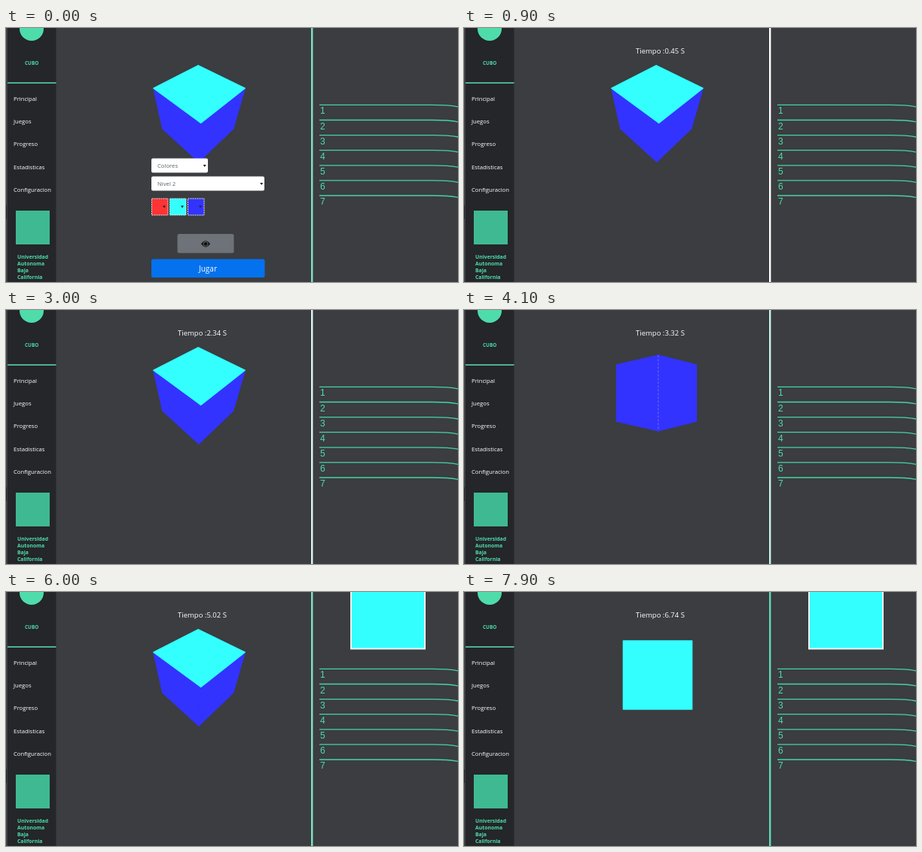
These frames come from a looping animation (600 by 338 pixels, 8 s). An HTML page:

```html
<!DOCTYPE html>
<html lang="es">
<head>
<meta charset="utf-8">
<title>Cubo</title>
<style>
  html, body { margin: 0; width: 100%; height: 100%; overflow: hidden; background: #3b3d40; }
  svg { display: block; width: 600px; height: 338px; font-family: "Open Sans", "Noto Sans", sans-serif; }
  .menu { fill: #fff; font-size: 7.7px; }
  .brand { fill: #4edcaa; font-weight: bold; font-size: 6.85px; }
  .rank { fill: #4edcaa; font: 12px "Liberation Sans", Arial, sans-serif; }
  .rule { fill: none; stroke: #46d3a3; stroke-width: 1.3; }
  .field { fill: #fff; }
  .choice { fill: #5a6068; font-size: 7.7px; }
  .swatch { stroke: #e4e4e4; stroke-width: 1; stroke-dasharray: 2 1; }
</style>
</head>
<body>
<svg viewBox="0 0 600 338">
  <rect width="600" height="338" fill="#3b3d40"/>
  <rect width="2" height="338" fill="#404245"/>
  <rect y="236" width="1" height="18" fill="#222427"/>
  <rect x="2" width="64.5" height="338" fill="#242629"/>
  <circle cx="34" cy="1" r="16" fill="#4edcaa"/>
  <text class="brand" x="25" y="48.5" style="font-size:6.4px">CUBO</text>
  <rect x="2" y="72.3" width="64.5" height="1.5" fill="#5fdcb9"/>
  <g id="menu"></g>
  <rect x="13" y="243" width="45" height="45" fill="#3fb991"/>
  <g id="school"></g>
  <rect id="bar" x="405" width="2.4" height="338"/>
  <g id="ranks"></g>
  <path id="answer" d="M458 -2V75.5H556V-2" fill="#33ffff" stroke="#f2f5f5" stroke-width="2"/>
  <g id="cube" stroke-width="1.5" stroke-linejoin="round"></g>
  <line id="edge" stroke="#c4c8e8" stroke-width=".8" stroke-dasharray="3 2"/>
  <text id="timer" x="228" y="33.6" fill="#fff" font-size="9.5"></text>
  <g id="setup">
    <rect class="field" x="193" y="173.5" width="75" height="19" rx="2"/>
    <text class="choice" x="201" y="186">Colores</text>
    <rect class="field" x="193" y="197.5" width="150" height="19" rx="2"/>
    <text class="choice" x="201" y="210">Nivel 2</text>
    <rect class="swatch" x="193.5" y="227" width="21.5" height="22" fill="#ff3333"/>
    <rect class="swatch" x="217.5" y="227" width="21.5" height="22" fill="#33ffff"/>
    <rect class="swatch" x="241.5" y="227" width="21.5" height="22" fill="#3333ff"/>
    <path fill="#222" d="M261.7 182h4l-2 3zM337.2 206h4l-2 3zM208 236.5h4l-2 3zM232 236.5h4l-2 3zM256 236.5h4l-2 3z"/>
    <rect x="227.5" y="274" width="75" height="25.5" rx="2.5" fill="#6d7378"/>
    <path d="M259 287.3Q265 279 271 287.3Q265 295.600 259 287.3Z" fill="#111"/>
    <circle cx="265" cy="287.3" r="3" fill="none" stroke="#6d7378" stroke-width=".9"/>
    <rect x="193" y="307.500" width="150.500" height="24.500" rx="2.5" fill="#0472ef"/>
    <text x="268" y="323.500" fill="#fff" font-size="10" text-anchor="middle">Jugar</text>
  </g>
</svg>
<script>
const LOOP = 8000, START = 400, ANSWERED = 5900;
const $ = id => document.getElementById(id);
const label = (cls, x, y, s) => `<text class="${cls}" x="${x}" y="${y}">${s}</text>`;

$('menu').innerHTML = ['Principal', 'Juegos', 'Progreso', 'Estadisticas', 'Configuracion']
  .map((s, i) => label('menu', 10, 97 + i * 30.2, s)).join('');
$('school').innerHTML = ['Universidad', 'Autonoma', 'Baja', 'California']
  .map((s, i) => label('brand', 15, 307.3 + i * 9, s)).join('');
$('ranks').innerHTML = Array.from({ length: 7 }, (_, i) => {
  const y = 102.4 + i * 20.1;
  return `<path class="rule" d="M416 ${y}H566Q588 ${y} 601 ${y + 2.6}"/>` + label('rank', 417, y + 12, i + 1);
}).join('');

// Linear interpolation through [time, value] pairs.
function track(keys, t) {
  const i = keys.findIndex(k => k[0] > t);
  if (i < 0) return keys.at(-1)[1];
  if (i === 0) return keys[0][1];
  const [t0, v0] = keys[i - 1], [t1, v1] = keys[i];
  return v0 + (v1 - v0) * (t - t0) / (t1 - t0);
}
const CLOCK = [[400, 0], [900, .45], [2000, 1.44], [4100, 3.32], [5200, 4.3], [6900, 5.84], [7900, 6.74]];
const PITCH = [[3100, 45], [3500, 0], [4150, 0], [4500, 45], [7350, 45], [7750, 90]];
const YAW = [[7350, 45], [7750, 0]];

const HALF = 37.4, DEPTH = 208;
const RING = [[-1, 1], [1, 1], [1, -1], [-1, -1]];

function project(x, y, z, pitch, yaw) {
  const cp = Math.cos(pitch), sp = Math.sin(pitch), cy = Math.cos(yaw), sy = Math.sin(yaw);
  const depth = z * cy - x * sy;
  const scale = DEPTH / (DEPTH - HALF * (depth * cp - y * sp));
  return [248.5 + (7 + HALF * (x * cy + z * sy)) * scale, 110.5 + HALF * (y * cp + depth * sp) * scale];
}

function drawCube(pitchDeg, yawDeg) {
  const rad = Math.PI / 180;
  const ring = y => RING.map(([x, z]) => project(x, y, z, pitchDeg * rad, yawDeg * rad));
  const top = ring(-1), base = ring(1);
  const faces = top.map((p, i) => {
    const j = (i + 1) % 4;
    return ['#3333ff', [p, top[j], base[j], base[i]]];
  });
  faces.push(['#33ffff', [...top].reverse()]);
  const area = q => q.reduce((sum, [x, y], i) => {
    const [u, v] = q[(i + 1) % 4];
    return sum + x * v - u * y;
  }, 0);
  $('cube').innerHTML = faces.filter(f => area(f[1]) > 1)
    .map(([c, q]) => `<polygon points="${q.join(' ')}" fill="${c}" stroke="${c}"/>`).join('');
  const [x1, y1] = top[0], [x2, y2] = base[0];
  Object.entries({ x1, y1, x2, y2, opacity: Math.max(0, .5 - pitchDeg / 90) })
    .forEach(([k, v]) => $('edge').setAttribute(k, v));
}

function draw(now) {
  const t = Math.floor(now % LOOP / 100) * 100;
  const playing = t >= START;
  $('setup').style.display = playing ? 'none' : '';
  $('timer').textContent = playing ? `Tiempo :${track(CLOCK, t).toFixed(2)} S` : '';
  $('answer').style.display = t >= ANSWERED ? '' : 'none';

  const glow = (1 + Math.cos((t - 900) / 6000 * 9 * 2 * Math.PI)) / 2;
  const mix = (a, b) => Math.round(a + (b - a) * glow);
  $('bar').setAttribute('fill', `rgb(${mix(95, 255)},${mix(218, 255)},${mix(180, 255)})`);

  drawCube(track(PITCH, t), track(YAW, t));
}

const began = performance.now();
function tick() {
  draw(performance.now() - began);
  requestAnimationFrame(tick);
}
tick();
</script>
</body>
</html>
```
